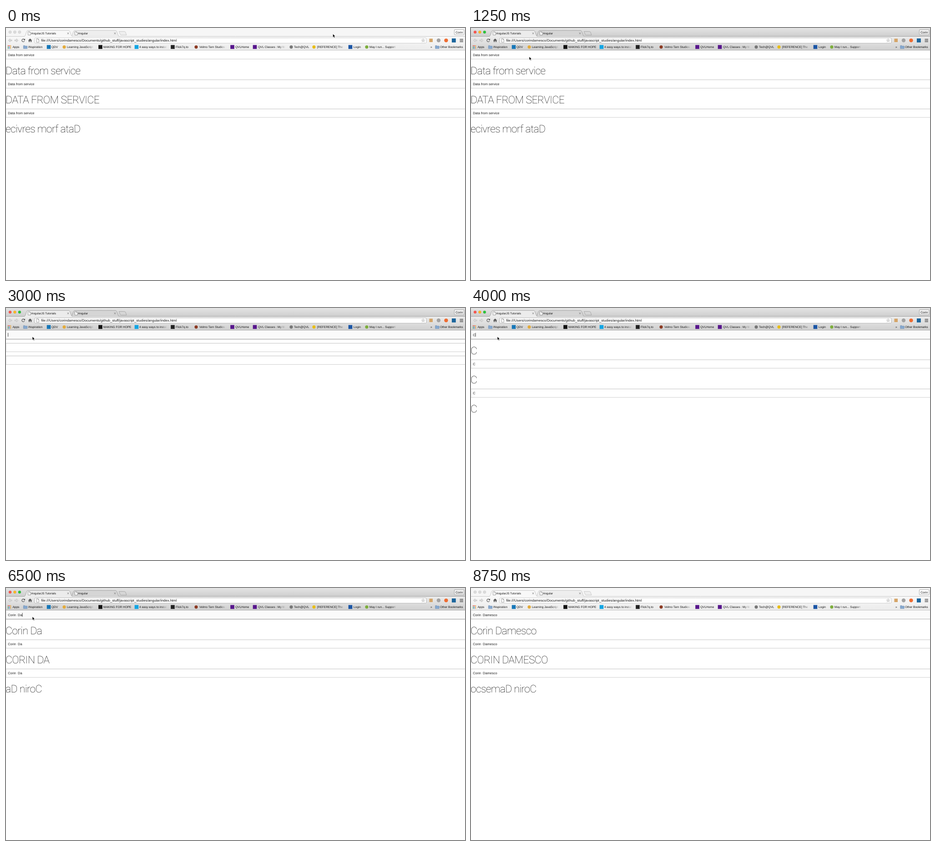
These frames come from a looping animation (1009x555 px, 9000 ms). An HTML page with a canvas:

```html
<!DOCTYPE html>
<html lang="en">
<head>
<meta charset="utf-8">
<title>AngularJS Tutorials</title>
<style>
  html, body { margin: 0; width: 100%; height: 100%; overflow: hidden; background: #fff; }
  canvas { display: block; }
</style>
</head>
<body>
<canvas id="stage" width="1009" height="555"></canvas>
<script>
const W = 1009, H = 555, LOOP = 9000;
const ctx = document.getElementById('stage').getContext('2d');
const SANS = '"Liberation Sans", Arial, sans-serif';
const NAME = 'Corin  Damesco';

// [time, number of typed characters]
const KEYS = [[3000, 0], [4000, 1], [4500, 2], [4750, 3], [5500, 5], [5750, 8],
              [6500, 9], [6750, 10], [7000, 12], [7250, 14]];

// [time, x, y] of the pointer tip
const POINTER = [[0, 718.5, 13], [250, 690, 22], [500, 540, 62], [750, 330, 93], [1000, 190, 82],
                 [1250, 128, 63], [1500, 104, 63], [1750, 78, 63], [2000, 62, 63], [2250, 58, 63],
                 [7500, 64, 63], [7750, 150, 62], [8000, 286.5, 54], [8250, 560, 30],
                 [8500, 795, 4], [8750, 786, -8.5]];

// [label, text x, text end, icon shape, icon x, icon colour]
const BOOKMARKS = [
  ['Apps', 14.5, 0, 'grid', 7.5],
  ['INspiration', 49, 0, 'folder', 42.5],
  ['QDV', 100, 0, 'square', 94, '#1677b8'],
  ['Learning JavaScript', 134, 193, 'circle', 128, '#e3ab3c'],
  ['MAKING FOR HOPE', 214, 0, 'square', 207.5, '#111'],
  ['4 easy ways to install', 293, 354, 'square', 287, '#12a5e4'],
  ['Flick7q.to', 373, 0, 'square', 366.5, '#222'],
  ['Velmo Tarn Studios |', 425, 484, 'circle', 418, '#8c3a22'],
  ['QVLHome', 504, 0, 'square', 497.5, '#57168c'],
  ['QVL Classes : My Work', 554, 614, 'square', 547, '#57168c'],
  ['Tech@QVL', 633, 0, 'circle', 627, '#777'],
  ['[REFERENCE] The New', 684, 744, 'circle', 677, '#e8bd18'],
  ['Login', 764, 0, 'square', 757, '#1b55a5'],
  ['May I run... Support', 799, 860, 'circle', 793, '#7dae3c'],
  ['»', 933, 0],
  ['Other Bookmarks', 954, 0, 'folder', 948]
];

const latest = (steps, t) => steps.filter(step => step[0] <= t).pop();

function rect(x, y, w, h, fill) {
  ctx.fillStyle = fill;
  ctx.fillRect(x, y, w, h);
}

function circle(x, y, r, fill, stroke) {
  ctx.beginPath();
  ctx.arc(x, y, r, 0, 7);
  ctx.fillStyle = fill;
  ctx.fill();
  if (stroke) outline(stroke, .6);
}

function outline(color, width = 1) {
  ctx.strokeStyle = color;
  ctx.lineWidth = width;
  ctx.stroke();
}

function shape(d, fill, stroke, width) {
  const path = new Path2D(d);
  if (fill) { ctx.fillStyle = fill; ctx.fill(path); }
  if (stroke) { ctx.strokeStyle = stroke; ctx.lineWidth = width || 1; ctx.stroke(path); }
}

function at(x, y, draw) {
  ctx.save();
  ctx.translate(x, y);
  draw();
  ctx.restore();
}

function text(str, x, y, size, color = '#111') {
  ctx.font = `${size}px ${SANS}`;
  ctx.fillStyle = color;
  ctx.fillText(str, x, y);
}

function verticalFade(y0, y1, top, bottom) {
  const g = ctx.createLinearGradient(0, y0, 0, y1);
  g.addColorStop(0, top);
  g.addColorStop(1, bottom);
  return g;
}

function fadingText(str, x, end, y, size) {
  const g = ctx.createLinearGradient(end - 13, 0, end, 0);
  g.addColorStop(0, '#111');
  g.addColorStop(1, 'rgba(17,17,17,0)');
  text(str, x, y, size, g);
}

function pageIcon(x, y) {
  at(x, y, () => shape('M.5 .5H4L6 2.5V8H.5ZM4 .5V2.5H6', '#fff', '#777', .7));
}

function icon(kind, x, color) {
  const y = 41.8;
  if (kind === 'square') rect(x - 4.3, y - 4.3, 8.6, 8.6, color);
  if (kind === 'circle') circle(x, y, 3.6, color);
  if (kind === 'folder') {
    at(x - 4.2, y - 3.5, () => shape('M0 .5H3.2L4 1.5H8.4V7H0Z', '#87a9d0', '#5f82ab', .6));
  }
  if (kind === 'grid') {
    const colors = ['#e0463a', '#e0463a', '#e8a02c', '#3c9a53', '#4579d8', '#e8a02c', '#3c9a53', '#4579d8', '#e8a02c'];
    colors.forEach((c, i) => rect(x - 3.6 + i % 3 * 2.7, y - 3.6 + (i / 3 | 0) * 2.7, 1.8, 1.8, c));
  }
}

function tab(x, right, label, fill, edge) {
  shape(`M${x} 18.5C${x + 4} 18 ${x + 4} 5.5 ${x + 8} 5.5H${right - 8}C${right - 4} 5.5 ${right - 4} 18 ${right} 18.5`, fill, edge, .8);
  pageIcon(x + 8, 7.5);
  text(label, x + 15.3, 14, 6.3);
  at(right - 9.5, 11.8, () => shape('M-1.8-1.8L1.8 1.8M1.8-1.8L-1.8 1.8', null, '#777', .9));
}

function tabStrip(active) {
  rect(0, 0, W, 19, active ? verticalFade(0, 19, '#e4e4e4', '#cdcdcd') : '#f6f6f6');
  const lights = active ? ['#fb5750', '#fcb827', '#2cc53c'] : ['#dcdcdc', '#dcdcdc', '#dcdcdc'];
  lights.forEach((c, i) => circle(9 + i * 10.4, 9, 3.1, c, active ? 'rgba(0,0,0,.15)' : '#c6c6c6'));

  const edge = active ? '#999' : '#bbb';
  const idle = active ? '#d5d5d5' : '#eee';
  shape('M0 18.5H1009', null, edge, .8);
  shape('M248.5 7.5H260.5Q262 7.5 262.8 9.5L265 15.5H253Q251.5 15.5 250.8 13.5Z', idle, edge, .7);
  tab(143, 249, 'Angular', idle, edge);
  tab(40, 146, 'AngularJS Tutorials', active ? '#ececec' : '#f8f8f8', edge);

  ctx.beginPath();
  ctx.roundRect(985.5, 3.5, 21.5, 11.5, 1.5);
  ctx.fillStyle = active ? '#eee' : '#fdfdfd';
  ctx.fill();
  outline('#999', .8);
  text('Corin', 988.3, 11.8, 6.6);
}

function toolbar(active) {
  rect(0, 19, W, 30, active ? verticalFade(19, 49, '#ececec', '#cfcfcf') : verticalFade(19, 49, '#f8f8f8', '#ebebeb'));
  rect(41, 18, 104, 1.5, active ? '#ececec' : '#f8f8f8');
  rect(0, 48.4, W, .9, active ? '#a0a0a0' : '#b8b8b8');

  const arrow = 'M0-3.6L-4 0L0 3.6V1.2H4V-1.2H0Z';
  at(9, 27.3, () => shape(arrow, '#ddd', '#b8b8b8', .7));
  at(23, 27.3, () => { ctx.scale(-1, 1); shape(arrow, '#ddd', '#b8b8b8', .7); });
  ctx.beginPath();
  ctx.arc(38, 27.3, 3.1, .5, 5.5);
  outline('#555', 1.2);
  shape('M41.9 23.3V27H38.2Z', '#555');
  at(53, 27.3, () => shape('M0-4L4.4 .3H3V3.8H1V1H-1V3.8H-3V.3H-4.4Z', '#555'));

  ctx.beginPath();
  ctx.roundRect(63, 21.8, 861, 11.6, 1.8);
  ctx.fillStyle = '#fff';
  ctx.fill();
  outline(active ? '#a8a8a8' : '#c0c0c0', .8);
  pageIcon(66.5, 23.3);
  text('file:///Users/corindamesco/Documents/github_stuff/javascript_studies/angular/index.html', 77, 30.1, 7.66);
  at(917, 27.5, () => shape('M0-4.3L1.2-1.4L4.3-1.3L1.9 .7L2.7 3.7L0 2L-2.7 3.7L-1.9 .7L-4.3-1.3L-1.2-1.4Z', '#ddd', '#bbb', .5));

  rect(930.5, 23.5, 7.5, 7.5, '#d5a467');
  circle(951, 27.3, 4.2, '#a3a3a3');
  circle(967.5, 27.3, 4.1, '#ee6b30');
  rect(980, 23, 8.8, 8.8, '#1b659c');
  for (let i = 0; i < 3; i++) rect(997.5, 24 + i * 2.8, 7.5, 1.4, '#555');

  for (const [label, x, end, kind, iconX, color] of BOOKMARKS) {
    if (kind) icon(kind, iconX, color);
    if (end) fadingText(label, x, end, 44, 6.5);
    else text(label, x, 44, 6.5);
  }
}

function heading(str, baseline) {
  ctx.font = '100 23px Roboto, Inter, sans-serif';
  ctx.letterSpacing = '-0.65px';
  ctx.fillStyle = '#000';
  ctx.fillText(str, -1, baseline);
  ctx.letterSpacing = '0px';
}

function page(t) {
  const key = latest(KEYS, t);
  const value = key ? NAME.slice(0, key[1]) : 'Data from service';
  const shown = value.replace(/\s+/g, ' ');
  const headings = [shown, shown.toUpperCase(), [...shown].reverse().join('')];
  const pitch = value ? 64.3 : 28;
  const focused = t >= 1750;

  headings.forEach((title, i) => {
    const y = 49.2 + i * pitch;
    const lit = focused && i === 0;
    if (lit) rect(0, y, W, 19.5, '#fafafa');
    if (i) rect(0, y, W, .9, '#bbb');
    rect(0, y, .7, 19.5, '#ddd');
    rect(0, y + 18.7, W, lit && t < 8750 ? 1.4 : .9, lit ? '#aaa' : '#c8c8c8');
    if (lit && t >= 2250 && !key) rect(4, 54.3, 58.5, 9, '#b4d5fe');
    text(value, 4.2, y + 12.4, 7.45, '#222');
    if (lit && key && t < 8750 && (t - key[0]) % 1000 < 500) {
      rect(4.2 + ctx.measureText(value).width, 54.8, .8, 8.4, '#111');
    }
    heading(title, y + 52.3);
  });
}

function pointer(t) {
  const [, x, y] = latest(POINTER, t);
  at(x, y, () => shape('M0 0V7.6L1.8 6L3 8.8L4.4 8.2L3.2 5.5H5.5Z', '#000', '#fff', .6));
}

function draw(now) {
  const t = now % LOOP;
  const active = t >= 1000 && t < 8750;
  ctx.textRendering = 'geometricPrecision';
  rect(0, 0, W, H, '#fff');
  page(t);
  tabStrip(active);
  toolbar(active);
  pointer(t);
}

const start = performance.now();
function tick() {
  draw(performance.now() - start);
  requestAnimationFrame(tick);
}
tick();
</script>
</body>
</html>
```
